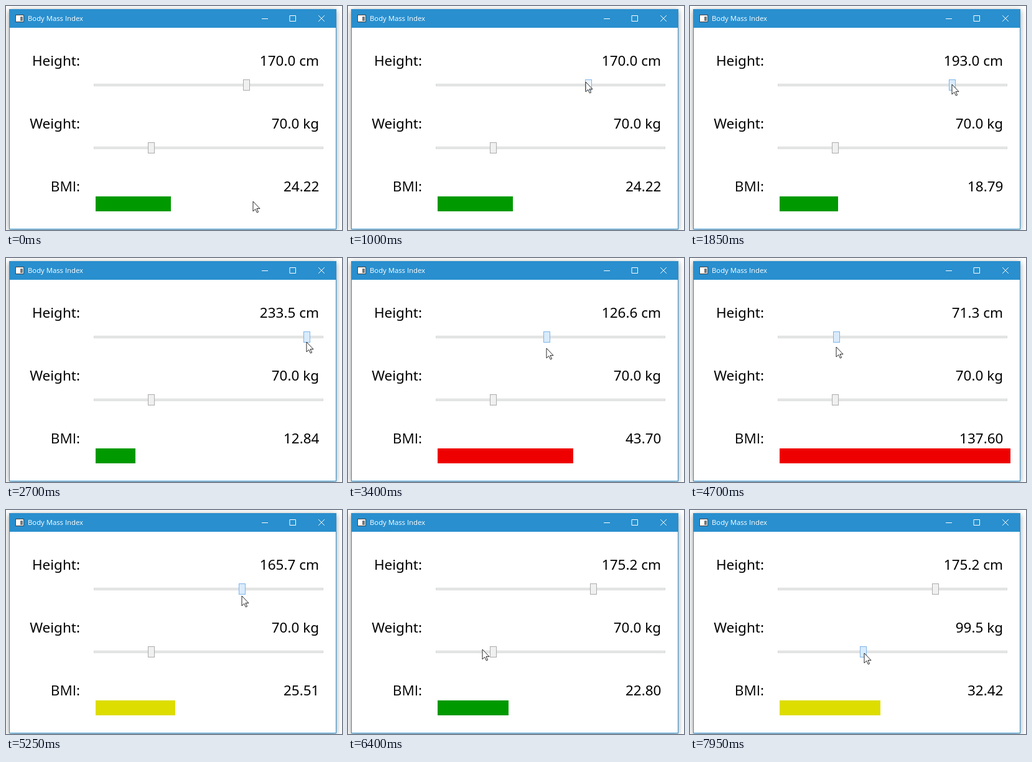
These frames come from a looping animation (540 by 360 pixels, 8 s). An HTML page:

```html
<!DOCTYPE html>
<html lang="en">
<head>
<meta charset="utf-8">
<title>Body Mass Index</title>
<style>
  html, body { margin: 0; width: 100%; height: 100%; overflow: hidden; background: #fff; }
  svg { display: block; width: 540px; height: 360px; }
  text { font: 22.5px "Noto Sans", "Open Sans", sans-serif; fill: #000; text-anchor: end; }
  .plain { font-family: "Open Sans", "Noto Sans", sans-serif; }
  .title { font-size: 11.3px; fill: #fff; text-anchor: start; }
  .track { fill: #e7eaea; stroke: #d9d9d9; }
  .thumb { fill: #f0f0f0; stroke: #acacac; }
  .thumb.hover { fill: #ecf4fc; stroke: #7eb4ea; }
  .thumb.pressed { fill: #d9ebfb; stroke: #7eb4ea; }
  .buttons { fill: none; stroke: #fff; stroke-linecap: square; }
  .frame { fill: #fff; stroke: #298fce; filter: drop-shadow(0 2px 5px #0006); }
</style>
</head>
<body>
<svg viewBox="0 0 540 360">
  <rect class="frame" x="5.5" y="5.5" width="525" height="353"/>
  <rect x="6" y="6" width="525" height="29" fill="#298fce"/>
  <rect x="15.5" y="14.5" width="13" height="11" fill="#fff" stroke="#444"/>
  <path d="M23 17h4v7h-4z" fill="#777"/>
  <text class="plain title" x="35" y="24">Body Mass Index</text>
  <path class="buttons" d="M411.5 20.5h9M456.5 15.5h9v9h-9zM502.5 15.5l9 9M511.5 15.5l-9 9"/>

  <text x="119" y="96">Height:</text>
  <text x="119" y="197">Weight:</text>
  <text class="plain" x="119" y="297.5">BMI:</text>
  <text id="heightText" x="503" y="96"></text>
  <text id="weightText" x="503" y="197"></text>
  <text id="bmiText" x="503.5" y="297.5"></text>

  <rect class="track" x="141.5" y="125.5" width="368" height="3"/>
  <rect class="track" x="141.5" y="226.5" width="368" height="3"/>
  <rect id="heightThumb" class="thumb" y="118.5" width="10" height="17"/>
  <rect id="weightThumb" class="thumb" y="219.5" width="10" height="17"/>
  <rect id="bar" x="144" y="306" height="24"/>
  <path id="pointer" d="M0 0v16l3.7-3.6 2.7 5.6 2.2-1-2.6-5.4h5z" fill="#fff" stroke="#111" stroke-width=".9"/>
</svg>
<script>
  const LOOP = 8000, STEP = 50;
  const MIN = 10, MAX = 250, LEFT = 141, SCALE = 1.5345;
  const toX = value => LEFT + (value - MIN) * SCALE;
  const toValue = x => MIN + (x - LEFT) / SCALE;

  const linear = p => p;
  const speedUp = p => p ** 1.57;
  const smooth = p => p * p * (3 - 2 * p);

  // The hand's moves; it rests between them. "bow" bends a move sideways.
  const home = { x: 397, y: 314 };
  const grip = toX(70) + 2.2;
  const moves = [
    { from: 200, to: 1050, x: 383, y: 121, ease: smooth, bow: -21 },
    { from: 1150, to: 1250, x: toX(170), y: 124, ease: linear },
    { from: 1600, to: 2200, x: 526, y: 133, ease: speedUp },
    { from: 2300, to: 3400, x: toX(126.57), y: 145, ease: speedUp },
    { from: 3400, to: 4000, x: 128, y: 148, ease: linear },
    { from: 4250, to: 5250, x: toX(165.66), y: 138, ease: smooth },
    { from: 5550, to: 6100, x: toX(175.22), y: 139, ease: p => Math.min(1, p * 3.5) },
    { from: 6100, to: 6400, x: 216, y: 224, ease: smooth },
    { from: 6400, to: 6750, x: grip, y: 230, ease: smooth },
    { from: 7450, to: 7950, x: grip + 29.54 * SCALE, y: 230, ease: linear }
  ];

  const el = id => document.getElementById(id);
  const clamp = (v, lo, hi) => Math.min(hi, Math.max(lo, v));

  function pointerAt(t) {
    let { x, y } = home;
    for (const move of moves) {
      if (t <= move.from) break;
      const p = move.ease(Math.min(1, (t - move.from) / (move.to - move.from)));
      x += (move.x - x) * p + (move.bow ?? 0) * Math.sin(Math.PI * p);
      y += (move.y - y) * p;
    }
    return { x, y };
  }

  function showSlider(name, value, unit, pressed, tip) {
    const thumb = el(name + 'Thumb');
    const x = Math.floor(toX(value));
    const y = +thumb.getAttribute('y');
    const hover = Math.abs(tip.x - x) < 6 && tip.y >= y - 1 && tip.y < y + 18;
    thumb.setAttribute('x', x - 4.5);
    thumb.setAttribute('class', 'thumb' + (pressed ? ' pressed' : hover ? ' hover' : ''));
    el(name + 'Text').textContent = `${value.toFixed(1)} ${unit}`;
  }

  function draw(t) {
    const tip = pointerAt(t);
    const height = clamp(toValue(pointerAt(clamp(t, 1600, 6100)).x), MIN, MAX);
    const weight = 70 + (pointerAt(Math.max(t, 7450)).x - grip) / SCALE;
    const bmi = weight / (height / 100) ** 2;

    showSlider('height', height, 'cm', t >= 1400 && t <= 6100, tip);
    showSlider('weight', weight, 'kg', t >= 7200, tip);
    el('bmiText').textContent = bmi.toLocaleString('en-US',
      { minimumFractionDigits: 2, maximumFractionDigits: 2 });
    el('bar').setAttribute('width', Math.min(371, Math.round(bmi * 5)));
    el('bar').setAttribute('fill', bmi < 25 ? '#009900' : bmi < 35 ? '#dddd00' : '#ee0000');
    el('pointer').setAttribute('transform',
      `translate(${Math.floor(tip.x)} ${Math.floor(tip.y)})`);
  }

  const start = performance.now();
  function tick() {
    const t = (performance.now() - start) % LOOP;
    draw(Math.floor(t / STEP) * STEP);
    requestAnimationFrame(tick);
  }
  tick();
</script>
</body>
</html>
```
